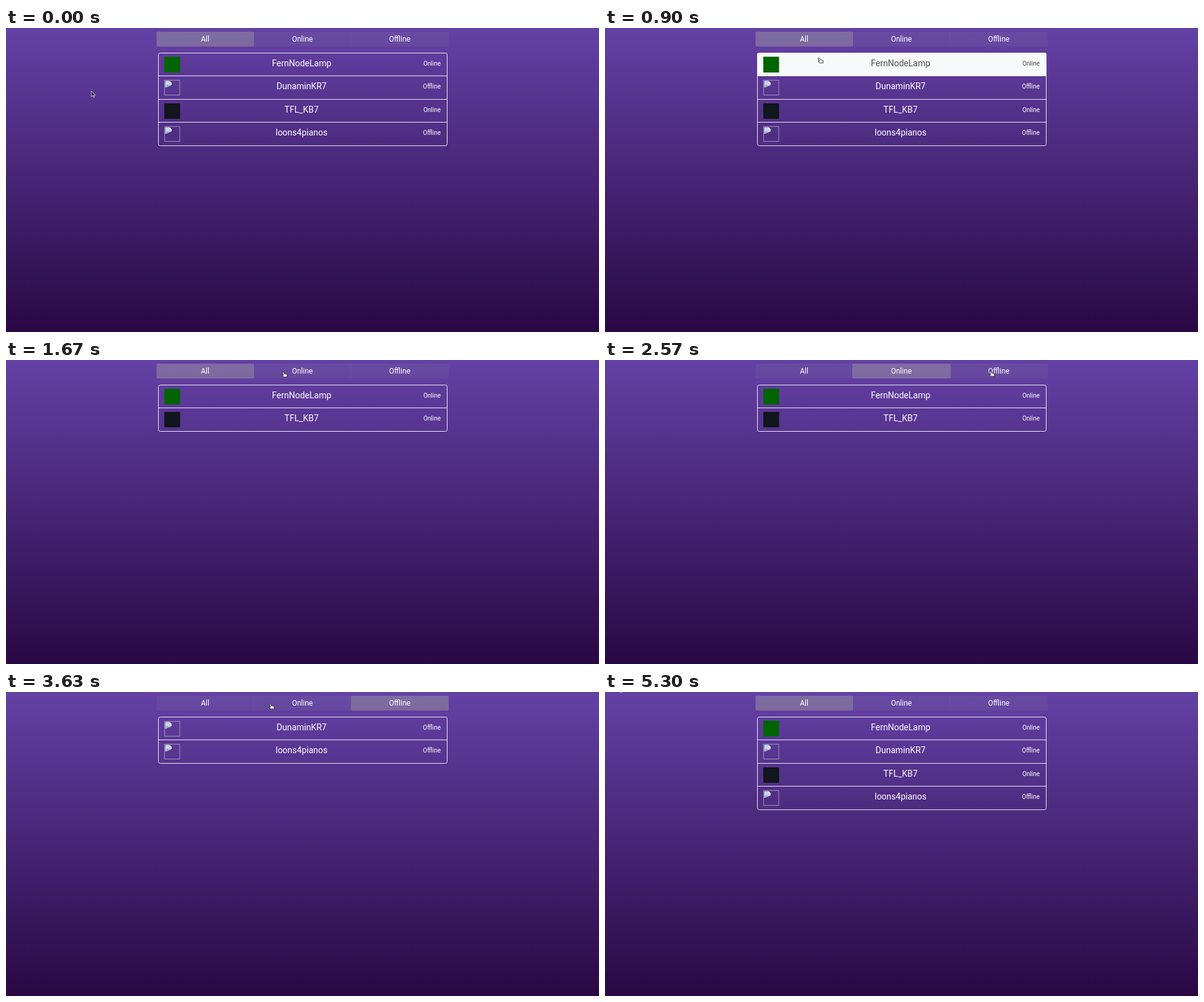
Write an HTML page that moves like this. It is 959 px wide and 492 px high and loops after 5.53 s.

```html
<!DOCTYPE html>
<html lang="en">
<head>
<meta charset="utf-8">
<title>Channel status list</title>
<style>
  html, body { margin: 0; width: 100%; height: 100%; overflow: hidden; background: #2a0845; }
  svg { display: block; width: 100%; height: 100%; font-family: Roboto, sans-serif; color: #fff; }
  text { fill: currentColor; }
  .tabs text { font-size: 12px; text-anchor: middle; }
  .name { font-size: 14px; text-anchor: middle; }
  .status { font-size: 10px; text-anchor: end; }
  .frame { fill: none; stroke: #fff; stroke-opacity: .9; }
  .active { fill: #a0a0a0; fill-opacity: .4; }

  /* One loop lasts 5530 ms: 1% is 55.3 ms. */
  .anim { animation: 5530ms step-end infinite; }
  .fade { animation-timing-function: linear; }
  .tab-all { animation-name: tab-all; }
  .tab-on { animation-name: tab-on; }
  .tab-off { animation-name: tab-off; }
  .list-all { animation-name: list-all; }
  .list-on { animation-name: list-on; }
  .list-off { animation-name: list-off; }
  .late-row { animation-name: late-row; }
  .hover { animation-name: hover; color: #495057; }
  .cursor { animation-name: move; animation-timing-function: ease-in-out; }
  .arrow { animation-name: arrow; }
  .hand { animation-name: hand; }

  @keyframes tab-all { 0%, 32% { opacity: 1 } 34.8%, 80.2% { opacity: 0 } 83%, 100% { opacity: 1 } }
  @keyframes tab-on { 0%, 32% { opacity: 0 } 34.8%, 56.1% { opacity: 1 } 58.8%, 100% { opacity: 0 } }
  @keyframes tab-off { 0%, 56.1% { opacity: 0 } 58.8%, 80.2% { opacity: 1 } 83%, 100% { opacity: 0 } }

  @keyframes list-all { 0% { opacity: 1 } 30.18% { opacity: 0 } 80.1%, 100% { opacity: 1 } }
  @keyframes list-on { 0% { opacity: 0 } 30.18% { opacity: 1 } 56.04%, 100% { opacity: 0 } }
  @keyframes list-off { 0% { opacity: 0 } 56.04% { opacity: 1 } 80.1%, 100% { opacity: 0 } }
  @keyframes late-row { 0% { opacity: 0 } 77.74% { opacity: 1 } 80.1%, 100% { opacity: 0 } }
  @keyframes hover { 0% { opacity: 0 } 13.18% { opacity: 1 } 23.4%, 100% { opacity: 0 } }

  @keyframes move {
    0% { transform: translate(138px, 102px) }
    2.6% { transform: translate(138px, 102px); animation-timing-function: cubic-bezier(.4, 0, .8, .8) }
    12.65% { transform: translate(286px, 60px); animation-timing-function: cubic-bezier(.3, .4, .6, 1) }
    16.25%, 21.2% { transform: translate(344px, 47.5px) }
    25.84%, 36.9% { transform: translate(446px, 18.5px) }
    46.45%, 57.5% { transform: translate(621px, 17.5px) }
    65.62%, 66.3% { transform: translate(425px, 18.5px) }
    66.9%, 69.5% { transform: translate(367px, 23.5px) }
    77.74%, 80.2% { transform: translate(301px, 23.5px) }
    89.1%, 91.2% { transform: translate(164px, 0) }
    95.8%, 100% { transform: translate(22px, -9.5px) }
  }
  @keyframes arrow { 0% { opacity: 1 } 13.18% { opacity: 0 } 84.5%, 100% { opacity: 1 } }
  @keyframes hand { 0% { opacity: 0 } 13.18% { opacity: 1 } 84.5%, 100% { opacity: 0 } }
</style>
</head>
<body>
<svg viewBox="0 0 959 492" preserveAspectRatio="none">
  <defs>
    <linearGradient id="sky" x2="0" y2="1">
      <stop stop-color="#6441a5"/>
      <stop offset="1" stop-color="#2a0845"/>
    </linearGradient>
    <clipPath id="late"><path d="M240 155H400V162H720V195H240Z"/></clipPath>

    <g id="missing">
      <rect x="256.5" y="47.5" width="24.5" height="24" fill="none" stroke="#b5abc4" stroke-opacity=".8"/>
      <path d="M258 49H264.5L267.5 52V55L258 59Z" fill="#c3d5f4" stroke="#e8e8ec" stroke-width=".8"/>
      <path d="M258.5 58.2Q260.5 53.5 263.4 56Z" fill="#5aa846"/>
      <path d="M264.5 49V52H267.5Z" fill="#fff"/>
    </g>
    <g id="online"><text class="status" x="703" y="61">Online</text></g>
    <g id="offline"><use href="#missing"/><text class="status" x="703" y="61">Offline</text></g>

    <g id="row1">
      <rect x="256" y="46.5" width="25.5" height="25.5" fill="#006400"/>
      <text class="name" x="478" y="62">FernNodeLamp</text>
      <use href="#online"/>
    </g>
    <g id="row2">
      <text class="name" x="478" y="62">DunaminKR7</text>
      <use href="#offline"/>
    </g>
    <g id="row3">
      <rect x="256" y="47" width="25.5" height="25" fill="#11151d"/>
      <text class="name" x="478" y="62">TFL_KB7</text>
      <use href="#online"/>
    </g>
    <g id="row4">
      <text class="name" x="478" y="62">loons4pianos</text>
      <use href="#offline"/>
    </g>
    <path id="pair" class="frame" d="M249.5 40.5H710.5a3 3 0 0 1 3 3V112.5a3 3 0 0 1-3 3H249.5a3 3 0 0 1-3-3V43.5a3 3 0 0 1 3-3ZM246.5 77.5H713.5"/>
  </defs>

  <rect width="959" height="492" fill="url(#sky)"/>

  <g class="tabs">
    <rect x="243.5" y="6" width="472.5" height="24" rx="2" fill="#a0a0a0" fill-opacity=".1"/>
    <path d="M400.5 6V30M558 6V30" stroke="#a0a0a0" stroke-opacity=".1"/>
    <rect class="active anim fade tab-all" x="243.5" y="6" width="157.5" height="24" rx="2"/>
    <rect class="active anim fade tab-on" x="400" y="6" width="159" height="24"/>
    <rect class="active anim fade tab-off" x="558" y="6" width="158" height="24" rx="2"/>
    <text x="322" y="22">All</text>
    <text x="479.3" y="22">Online</text>
    <text x="636.8" y="22">Offline</text>
  </g>

  <g class="anim list-all">
    <rect class="frame" x="246.5" y="40.5" width="467" height="150" rx="3"/>
    <path class="frame" d="M246.5 77.5H713.5M246.5 115.5H713.5M246.5 152.5H713.5"/>
    <use href="#row1"/>
    <use href="#row2" y="37"/>
    <use href="#row3" y="75"/>
    <use href="#row4" y="112"/>
  </g>
  <g class="anim list-on">
    <use href="#pair"/>
    <use href="#row1"/>
    <use href="#row3" y="37"/>
  </g>
  <g class="anim list-off">
    <use href="#pair"/>
    <use href="#row2"/>
    <use href="#row4" y="37"/>
  </g>
  <g class="anim late-row" clip-path="url(#late)">
    <path class="frame" d="M246.5 150V187.5a3 3 0 0 0 3 3H710.5a3 3 0 0 0 3-3V150"/>
    <use href="#row4" y="112"/>
  </g>
  <g class="anim hover">
    <path d="M246 78V43a3 3 0 0 1 3-3H711a3 3 0 0 1 3 3V78Z" fill="#f8f9fa"/>
    <use href="#row1"/>
  </g>

  <g class="anim cursor">
    <path class="anim arrow" d="M0 0V9L2.1 7.2 3.6 10.4 5 9.8 3.6 6.8H6.4Z" fill="#000" stroke="#fff" stroke-width=".8"/>
    <path class="anim hand" d="M.7 1.6C1 .4 2.2 .4 2.9 1.5L4.2 3.6 7.6 4.4Q9 4.8 8.9 6.2L8.6 9H3.4L.6 6.6Q.4 5.6 1.6 5.7L2.9 6.2Z" fill="#fff" stroke="#111" stroke-width=".9"/>
  </g>
</svg>
</body>
</html>
```
